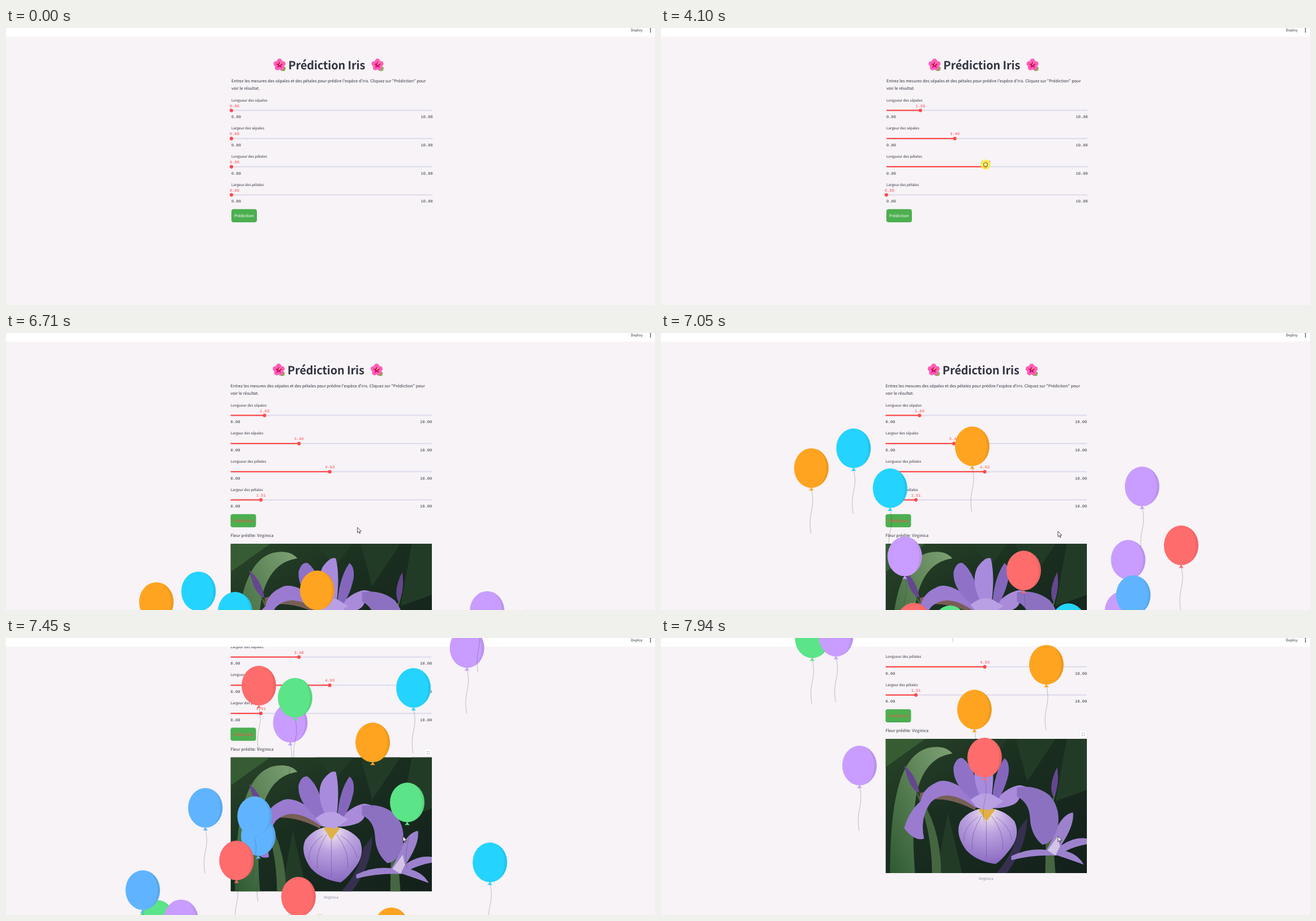
An HTML page that plays this animation: 1146 by 489 pixels, repeating every 7.99 s.

```html
<!DOCTYPE html>
<html lang="fr">
<head>
<meta charset="utf-8">
<title>Prédiction Iris</title>
<style>
  html, body { margin: 0; width: 100%; height: 100%; overflow: hidden; background: #f7f3f7; }
  svg { display: block; width: 100%; height: 100%; }
  text {
    font: 7.23px "Noto Sans CJK JP", "Noto Sans CJK SC", "Open Sans", sans-serif;
    fill: #31333f; text-rendering: geometricPrecision; white-space: pre;
  }
  text.title { font-size: 19.88px; font-weight: 700; letter-spacing: -.11px; }
  text.small { font-size: 6.33px; }
  text.mono { font: 7.07px "Liberation Mono", "DejaVu Sans Mono", monospace; }
  text.value { fill: #ff4b4b; text-anchor: middle; }
  text.caption { fill: #8486a0; text-anchor: middle; }
  .end { text-anchor: end; }
</style>
</head>
<body>
<svg viewBox="0 0 1146 489" preserveAspectRatio="none">
  <defs>
    <g id="flower">
      <path d="M3 6Q8 5 11 9Q6 13 1 9ZM7 3Q11 3 11 7L7 7Z" fill="#74b340"/>
      <g fill="#ff5fb7">
        <circle cx="0" cy="-6.2" r="4.7"/>
        <circle cx="5.9" cy="-1.9" r="4.7"/>
        <circle cx="3.6" cy="5" r="4.7"/>
        <circle cx="-3.6" cy="5" r="4.7"/>
        <circle cx="-5.9" cy="-1.9" r="4.7"/>
      </g>
      <path d="M0-6L1.8-2 6-2 3 1.4 4 5.6 0 3.4-4 5.6-3 1.4-6-2-1.8-2Z" fill="#e0127f"/>
      <circle r="2.3" fill="#a8124f"/>
      <path d="M0 0L2.6-3.4" stroke="#ffd24a" stroke-width="1.5" stroke-linecap="round"/>
    </g>
    <g id="balloon">
      <path d="M.5 75C5 94 1 106-.8 116S-3 138-.6 150.5" fill="none" stroke="#31333f" stroke-opacity=".36" stroke-width=".8"/>
      <path d="M0 69L4.2 75.4Q0 74-4.2 75.4Z" fill="currentColor"/>
      <ellipse cy="35" rx="30.5" ry="35" fill="currentColor"/>
      <path d="M8 1.2A30.5 35 0 0 1-6 69.3A24.5 34.8 0 0 0 8 1.2Z" fill="#000" fill-opacity=".065"/>
    </g>
    <linearGradient id="shade" x1="0" y1="0" x2="1" y2="1">
      <stop offset="0" stop-color="#2a4529"/>
      <stop offset=".4" stop-color="#1a2f20"/>
      <stop offset="1" stop-color="#131f1b"/>
    </linearGradient>
    <linearGradient id="leaf" x1="0" y1="1" x2="1" y2="0">
      <stop offset="0" stop-color="#2f5a31"/>
      <stop offset="1" stop-color="#7fa274"/>
    </linearGradient>
    <radialGradient id="fall" cx=".5" cy=".1" r=".9">
      <stop offset="0" stop-color="#f0e6ee"/>
      <stop offset=".4" stop-color="#bba2e0"/>
      <stop offset="1" stop-color="#8a6ac2"/>
    </radialGradient>
    <clipPath id="frame"><path d="M0 0H355.5V237H0Z"/></clipPath>
  </defs>

  <path d="M0 0H1146V489H0Z" fill="#f7f3f7"/>

  <g id="page">
    <use href="#flower" x="483" y="65"/>
    <text class="title" x="498.5" y="73.4">Prédiction Iris</text>
    <use href="#flower" x="656" y="65"/>
    <text x="398" y="95.9">Entrez les mesures des sépales et des pétales pour prédire l'espèce d'iris. Cliquez sur "Prédiction" pour</text>
    <text x="398" y="109">voir le résultat.</text>
    <g id="sliders"></g>
    <rect x="398" y="319.7" width="45" height="23.3" rx="4" fill="#4caf50"/>
    <text id="go" x="403" y="334.3">Prédiction</text>

    <g id="result">
      <text x="398" y="360.3">Fleur prédite: Virginica</text>
      <g transform="translate(398 372)" clip-path="url(#frame)">
        <path d="M0 0H356V237H0Z" fill="url(#shade)"/>
        <path d="M150 0H215L185 40ZM230 0H300L250 75ZM320 0H356V90L300 110ZM90 237L110 130 135 237Z" fill="#223b27"/>
        <path d="M0 0H70L0 50Z" fill="#375c34"/>
        <path d="M8 237C8 110 25 30 75 16Q105 10 118 26Q70 32 55 95Q45 150 52 237Z" fill="url(#leaf)"/>
        <path d="M52 90Q98 150 98 237H82Q82 160 52 90ZM302 90L292 130 300 237 282 237 284 130Z" fill="#456640"/>
        <path d="M33 47Q55 65 60 96Q42 90 33 47ZM303 50Q308 80 297 104Q286 85 303 50Z" fill="#65478f"/>
        <path d="M235 160Q228 200 196 237H214Q250 190 250 140Z" fill="#35304f"/>
        <path d="M60 96Q100 80 160 118L158 126Q105 98 62 110Z" fill="#775f55"/>
        <path d="M222 207Q252 192 284 196Q296 176 304 154Q316 132 331 130Q334 152 310 188Q334 172 356 176V186Q334 190 318 198Q340 204 350 222Q322 212 304 206Q262 204 222 214Z" fill="#9c82cd"/>
        <path d="M286 197L304 172 308 190 300 206Z" fill="#d3c4e6"/>
        <path d="M165 110Q112 62 88 78Q66 88 62 110Q40 130 33 158Q52 182 68 176Q60 140 80 112Q110 84 160 122Z" fill="#9a7bd0"/>
        <path d="M185 116Q215 84 236 82Q256 84 250 92L236 96Q240 108 226 116Q206 124 185 122Z" fill="#a98bda"/>
        <path d="M232 86Q264 80 290 100Q310 124 304 156Q295 185 277 187Q256 170 255 138Q253 112 232 102Z" fill="#8d71c1"/>
        <path d="M166 116Q118 86 120 50Q125 32 136 34Q158 50 170 112Z" fill="#8f72c8"/>
        <path d="M188 116Q190 62 210 34Q220 42 217 62Q210 96 190 118Z" fill="#8467bd"/>
        <path d="M174 114Q148 70 162 42Q176 22 186 26Q194 60 186 112Z" fill="#a88bdc"/>
        <path d="M178 122Q210 124 228 146Q238 170 222 192Q205 215 194 221Q160 216 142 196Q122 168 132 146Q148 124 178 122Z" fill="url(#fall)"/>
        <path d="M178 130V212M170 136Q150 165 153 196M187 136Q210 165 207 196M163 138Q138 155 138 180M195 138Q220 155 223 178" fill="none" stroke="#70509f" stroke-width="1" stroke-opacity=".6"/>
        <path d="M165 126L178 146 193 126 185 120H172Z" fill="#e0b04a"/>
        <path d="M150 108Q168 92 188 98L208 110 184 126 162 122Z" fill="#b9a0e4"/>
      </g>
      <g id="expand">
        <rect x="740.5" y="357.5" width="13" height="13" rx="2.5" fill="#fff" stroke="#e5e2e9" stroke-width=".6"/>
        <path d="M745 363V361.8H746.2M748 361.8H749.2V363M749.2 365V366.2H748M746.2 366.2H745V365" fill="none" stroke="#777985" stroke-width=".8"/>
      </g>
      <text class="small caption" x="575.5" y="621">Virginica</text>
    </g>
  </g>

  <path d="M0 0H1146V15.3H0Z" fill="#fff"/>
  <text class="small" x="1103.3" y="6">Deploy</text>
  <g fill="#31333f">
    <circle cx="1138" cy="1.2" r="1"/><circle cx="1138" cy="4" r="1"/><circle cx="1138" cy="6.8" r="1"/>
  </g>

  <g id="sky"></g>

  <g id="cursor" stroke="#222" stroke-width=".8" stroke-linejoin="round" fill="#fff">
    <path id="arrow" d="M0 0V9.6L2.2 7.6 3.7 11 5.1 10.4 3.7 7.1H6.8Z"/>
    <path id="hand" d="M-1 1a1 1 0 0 1 2 0v3.2l2.6.6q1.2.4 1 1.8l-.6 3.6h-4.4l-2.9-3.6q.4-1.4 2.3-.2z"/>
    <g id="press">
      <circle r="9" fill="#ffee30" fill-opacity=".76" stroke="none"/>
      <path d="M-3.4-.4Q-3.6-2.6-2-2.4Q-1.6-3.8-.2-3.2Q1.2-3.8 1.8-2.6Q3.6-2.6 3.6-.8Q3.6 2 2.2 3.8H-1.4Q-3.8 1.8-3.4-.4Z" fill="#fff6a0" fill-opacity=".6"/>
    </g>
  </g>
</svg>

<script>
const LOOP = 7990, LEFT = 398, WIDTH = 355.3;
const $ = id => document.getElementById(id);

function add(parent, tag, attrs, text) {
  const el = document.createElementNS("http://www.w3.org/2000/svg", tag);
  for (const name in attrs) el.setAttribute(name, attrs[name]);
  if (text) el.textContent = text;
  return parent.appendChild(el);
}
const show = (el, on) => { el.style.display = on ? "" : "none"; };
const move = (el, x, y) => el.setAttribute("transform", `translate(${x} ${y})`);

// Sliders: label, value after the click, time of the change
const sliders = [
  ["Longueur des sépales", 1.69, 2000],
  ["Largeur des sépales", 3.4, 3100],
  ["Longueur des pétales", 4.93, 4100],
  ["Largeur des pétales", 1.51, 5240]
].map(([label, value, time], i) => {
  const g = add($("sliders"), "g", { transform: `translate(0 ${i * 49.7})` });
  add(g, "text", { class: "small", x: LEFT, y: 129.5 }, label);
  add(g, "text", { class: "mono", x: LEFT, y: 159.2 }, "0.00");
  add(g, "text", { class: "mono end", x: LEFT + WIDTH + .4, y: 159.2 }, "10.00");
  const bar = { x: LEFT, y: 144.3, height: 2.3, rx: 1 };
  add(g, "rect", { ...bar, width: WIDTH, fill: "#dfddec" });
  return {
    value, time,
    fill: add(g, "rect", { ...bar, width: 0, fill: "#ff4b4b" }),
    thumb: add(g, "circle", { cy: 145.5, r: 3.1, fill: "#ff4b4b" }),
    text: add(g, "text", { class: "mono value", y: 139.6 })
  };
});

function setSlider(s, t) {
  const v = t >= s.time ? s.value : 0, len = WIDTH * v / 10;
  s.fill.setAttribute("width", len);
  s.thumb.setAttribute("cx", LEFT + len);
  s.text.setAttribute("x", Math.max(LEFT + len, 403.5));
  s.text.textContent = v.toFixed(2);
}

const colors = { r: "#ff6c6c", o: "#ffa421", p: "#c89dff", c: "#24d4ff", g: "#5ce488", b: "#60b4ff" };
// Balloons from back to front: colour, centre x, start time
const balloons = [
  ["o", 265.5, 6552], ["c", 340, 6521], ["c", 404.5, 6585], ["o", 549.5, 6518], ["p", 849.5, 6582],
  ["p", 430.5, 6724], ["r", 640.5, 6754], ["p", 825, 6731], ["r", 918.5, 6702], ["p", 814, 6864],
  ["b", 834, 6814], ["r", 446.5, 6912], ["p", 502, 6962], ["g", 510.5, 6928], ["c", 719.5, 6915],
  ["o", 647.5, 6990], ["b", 352, 7091], ["b", 445.5, 7140], ["b", 439, 7105], ["g", 708.5, 7082],
  ["r", 407, 7187], ["c", 854.5, 7191], ["g", 267, 7342], ["b", 241.5, 7253], ["p", 309, 7340],
  ["r", 516.5, 7270], ["o", 680.5, 7375], ["o", 553.5, 7434], ["r", 571.5, 7502], ["p", 350.5, 7514]
].map(([color, x, start]) => ({
  x, start,
  span: start < 6600 ? 705 : 675,
  el: add($("sky"), "use", { href: "#balloon", color: colors[color] })
}));

// cubic-bezier(.42, 0, 1, 1)
function easeIn(x) {
  let lo = 0, hi = 1;
  for (let i = 0; i < 18; i++) {
    const s = (lo + hi) / 2, r = 1 - s;
    if (1.26 * s * r * r + 3 * s * s * r + s * s * s < x) lo = s; else hi = s;
  }
  return lo * lo * (3 - 2 * lo);
}

function setBalloon(b, t) {
  const k = (t - b.start) / b.span, on = k > 0 && k < 1;
  show(b.el, on);
  if (on) move(b.el, b.x, 489 - 640 * easeIn(k));
}

// Linear track through [time, ...values] points
function along(points, t) {
  let i = 1;
  while (i < points.length - 1 && t > points[i][0]) i++;
  const a = points[i - 1], b = points[i];
  const k = Math.min(1, Math.max(0, (t - a[0]) / (b[0] - a[0])));
  return a.slice(1).map((v, j) => v + (b[j + 1] - v) * k);
}

const route = [
  [380, 858, 433], [590, 605, 243], [730, 605, 243], [1390, 458, 142], [2210, 458, 142],
  [2840, 519, 192], [3240, 519, 192], [3900, 573, 241], [4250, 573, 241], [4980, 452, 291],
  [5390, 452, 291], [5770, 423, 341], [6400, 423, 341], [6710, 620.5, 343], [6850, 701, 350]
];
const scroll = [[7060, 0], [7260, 112.7], [7450, 161.5], [7600, 186], [7720, 194]];
const presses = [[1930, 2130], [3100, 3300], [4100, 4310], [5240, 5440], [6040, 6240]];
const stops = [[458, 142], [519, 192], [573, 241], [452, 291], [423, 341]];
const marks = [0, 1930, 4100, 6710, 7260, 7450, 7940, LOOP];

// Motion is held on about 15 steps per second
function hold(t) {
  let i = 0;
  while (t >= marks[i + 1]) i++;
  const a = marks[i], len = marks[i + 1] - a, n = Math.round(len / 66.7);
  return a + Math.floor((t - a) / len * n + 1e-6) * len / n;
}

function setCursor(t, step) {
  const [x, y] = along(route, step);
  const press = presses.some(([a, b]) => t >= a && t < b);
  const near = stops.some(([sx, sy]) => Math.hypot(x - sx, y - sy) < 8);
  show($("cursor"), t >= 380);
  show($("press"), press);
  show($("hand"), near && !press);
  show($("arrow"), !near && !press);
  move($("cursor"), x, y);
}

function draw(t) {
  const step = hold(t), done = t >= 6380;
  sliders.forEach(s => setSlider(s, t));
  balloons.forEach(b => setBalloon(b, step));
  setCursor(t, step);
  $("go").style.fill = t >= 5700 ? "#ff4b4b" : "#fff";
  show($("result"), done);
  show($("expand"), t >= 7390);
  move($("page"), done ? -1.5 : 0, -along(scroll, step)[0]);
}

const begin = performance.now();
function tick() {
  draw((performance.now() - begin) % LOOP);
  requestAnimationFrame(tick);
}
tick();
</script>
</body>
</html>
```
